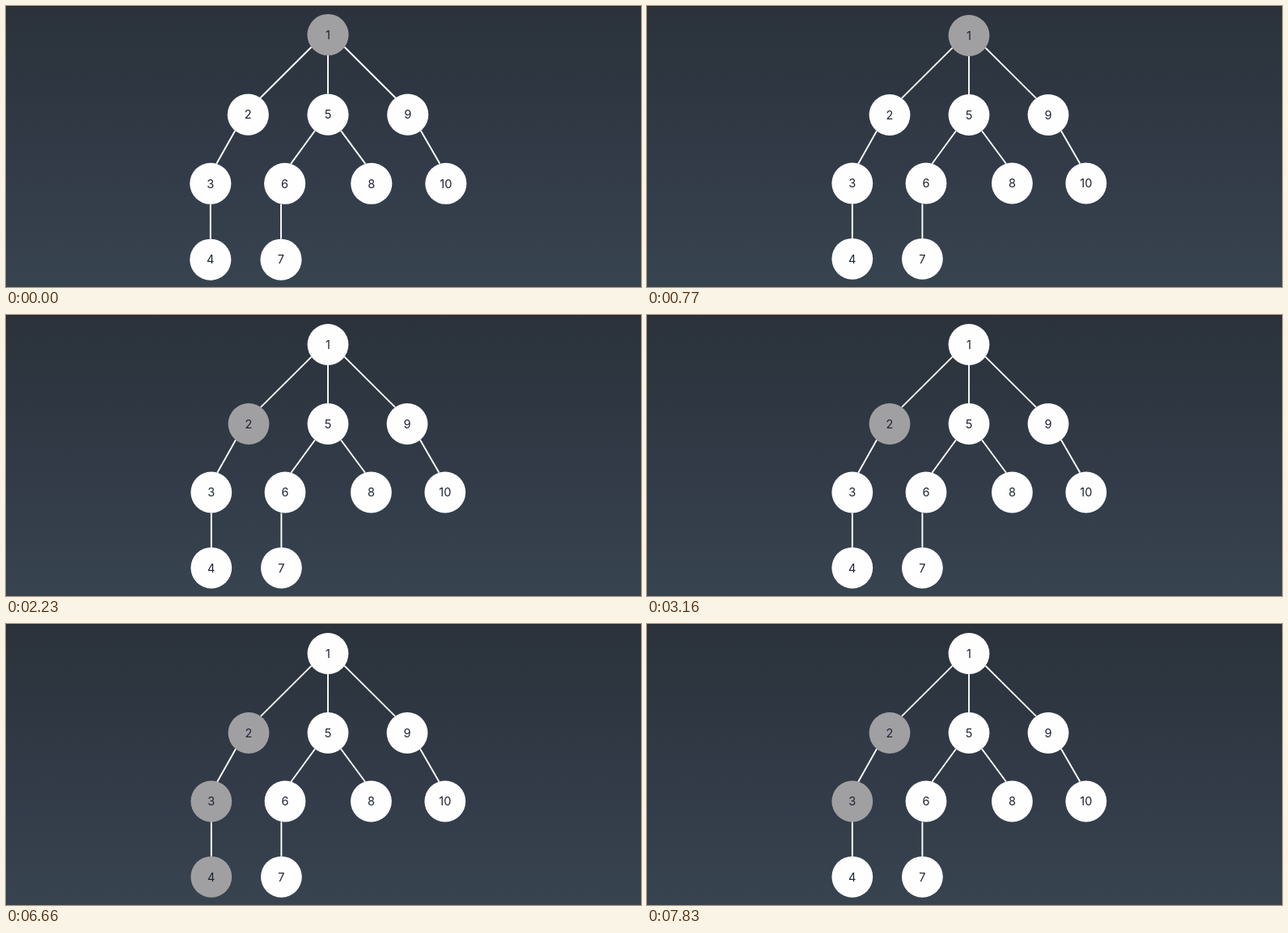
Animation of 785 by 347 pixels, one loop 8000 ms. Source, as an HTML page:

```html
<!DOCTYPE html>
<html lang="en">
<head>
<meta charset="utf-8">
<title>Tree traversal</title>
<style>
html, body { margin: 0; width: 100%; height: 100%; overflow: hidden; background: #2d343f; }
svg { display: block; width: 785px; height: 347px; }
line { stroke: #fff; stroke-width: 1.9; }
text { font: 14.5px Inter, "Noto Sans", sans-serif; fill: #1d2333; text-anchor: middle; }
</style>
</head>
<body>
<svg viewBox="0 0 785 347">
  <defs>
    <linearGradient id="bg" x2="0" y2="1">
      <stop offset="0" stop-color="#2b323c"/>
      <stop offset=".3" stop-color="#2e3741"/>
      <stop offset=".6" stop-color="#333b49"/>
      <stop offset="1" stop-color="#37444f"/>
    </linearGradient>
  </defs>
  <rect width="785" height="347" fill="url(#bg)"/>
  <rect width="785" height="1" fill="#232934"/>
  <g id="tree"></g>
</svg>
<script>
const LOOP = 8000, CENTRE = 398, RADIUS = 25.4;
const WHITE = '#fefefe', GREY = '#a0a0a2';
const rows = [36.5, 134.5, 219, 312.3];
// each node: distance from the centre line, then its children
const root = [0,
  [-98, [-144.2, [-144.2]]],
  [0, [-53, [-57.6]], [53.4]],
  [98, [144.8]]
];
const tree = document.getElementById('tree');
const discs = [];

function add(tag, attrs, text = '') {
  const el = document.createElementNS('http://www.w3.org/2000/svg', tag);
  for (const key in attrs) el.setAttribute(key, attrs[key]);
  el.textContent = text;
  return tree.appendChild(el);
}

// point on a disc's rim, angle measured down from the horizontal
function rim(x, y, side, degrees) {
  const a = degrees * Math.PI / 180;
  return [x + side * RADIUS * Math.cos(a), y + RADIUS * Math.sin(a)];
}

// lines leave and enter the discs more steeply on lower levels
function addEdge(px, x, depth) {
  const side = Math.sign(x - px), upright = Math.abs(x - px) < 6;
  const leave = upright ? 90 : 22 + 14.5 * depth;
  const enter = upright ? 90 : 35 + 19 * depth;
  const [x1, y1] = rim(upright ? x : px, rows[depth - 1], side, leave);
  const [x2, y2] = rim(x, rows[depth], -side, -enter);
  add('line', { x1, y1, x2, y2 });
}

// preorder walk, which also numbers the nodes
function build([offset, ...children], depth = 0, px) {
  const cx = CENTRE + offset, cy = rows[depth];
  discs.push(add('circle', { cx, cy, r: RADIUS }));
  add('text', { x: cx, y: cy + 5.2 }, discs.length);
  if (depth) addEdge(px, cx, depth);
  children.forEach(child => build(child, depth + 1, cx));
}

function greyNodes(t) {
  if (t < 2230) return [1];
  if (t < 6660) return [2];
  return t < 7830 ? [2, 3, 4] : [2, 3];
}

function draw(t) {
  const grey = greyNodes(t);
  discs.forEach((disc, i) => disc.setAttribute('fill', grey.includes(i + 1) ? GREY : WHITE));
  // opening zoom dies away in steps
  const zoom = 1 + 0.007 * 6 ** -Math.floor(t / 77);
  tree.setAttribute('transform', `translate(${CENTRE} 180) scale(${zoom}) translate(${-CENTRE} -180)`);
}

build(root);
const start = performance.now();
function tick() {
  draw((performance.now() - start) % LOOP);
  requestAnimationFrame(tick);
}
tick();
</script>
</body>
</html>
```
